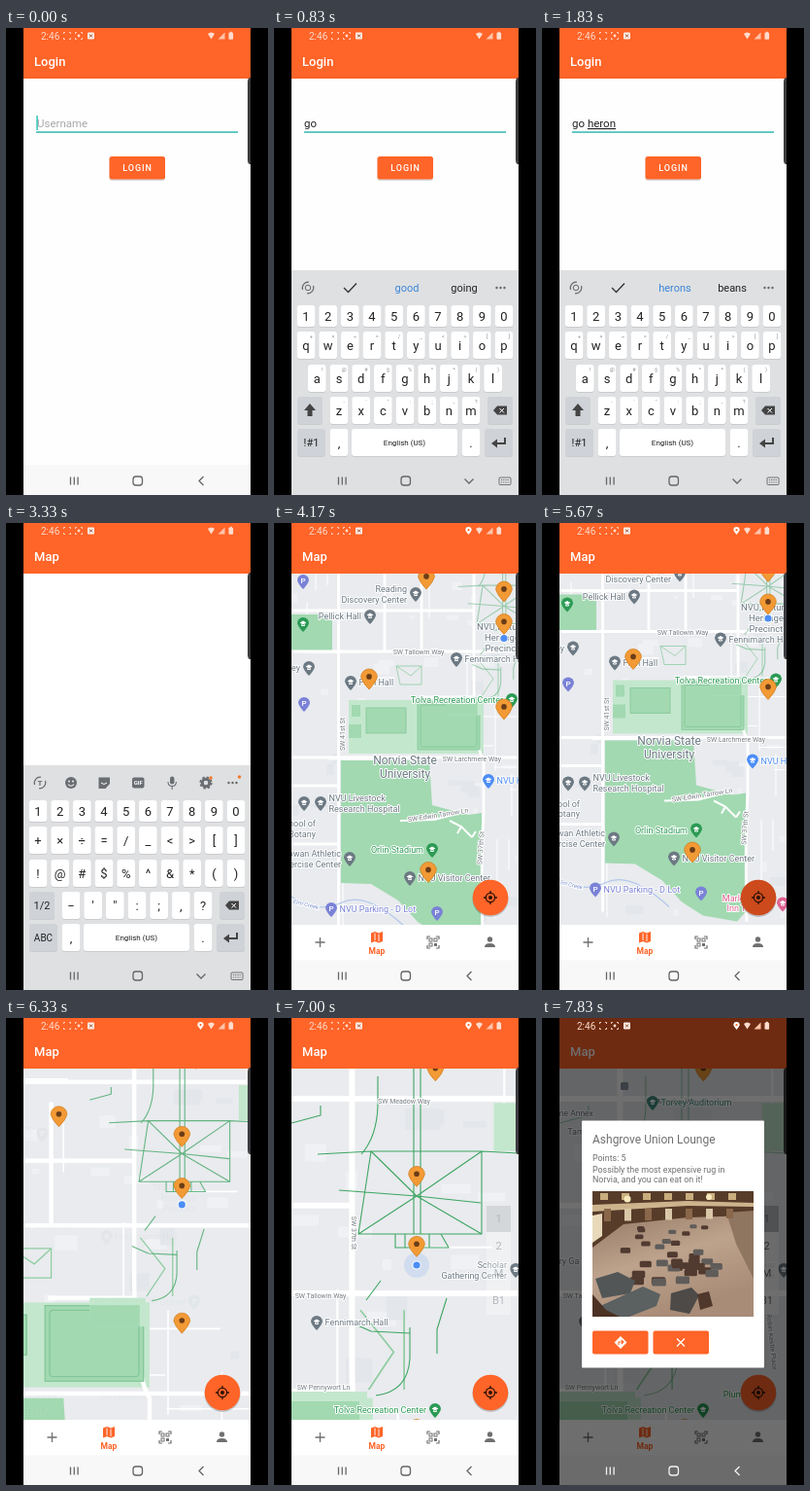
Recreate the animation shown at these times as an HTML page. Size 270x480 px, loop 8000 ms.

```html
<!DOCTYPE html>
<html lang="en">
<head>
<meta charset="utf-8">
<title>Campus map app</title>
<style>
html, body { margin: 0; width: 100%; height: 100%; overflow: hidden; background: #000; }
svg { display: block; width: 100vw; height: 100vh; font-family: Roboto, "Open Sans", sans-serif; }
.halo { paint-order: stroke; stroke: #fff; stroke-width: 2px; stroke-linejoin: round; }
.fixed { vector-effect: non-scaling-stroke; }
</style>
</head>
<body>
<svg id="stage" viewBox="0 0 270 480"></svg>
<script>
const ORANGE = '#ff6428', GRAY = '#6c7983', GREEN = '#2b9a54', BLUE = '#4c8df5', VIOLET = '#7a82d6';
const GRASS = '#a2d9b1', PARK = '#c3e7cd', ICON = '#707070', LIGHT = '#ffdccd';
const LOOP = 8000, ZOOM = 2.15, HOME = [237, 118.5];

const clamp = v => Math.max(0, Math.min(1, v));
const ramp = (v, a, b) => clamp((v - a) / (b - a));
const ease = p => p * p * (3 - 2 * p);
const mix = (a, b, p) => a + (b - a) * p;

const rect = (x, y, w, h, fill, r = 0, more = '') =>
  `<rect x="${x}" y="${y}" width="${w}" height="${h}" rx="${r}" fill="${fill}" ${more}/>`;
const circle = (x, y, r, fill, more = '') => `<circle cx="${x}" cy="${y}" r="${r}" fill="${fill}" ${more}/>`;
const line = (d, color, w = 1, more = '') =>
  `<path d="${d}" fill="none" stroke="${color}" stroke-width="${w}" ${more}/>`;
const shape = (d, fill) => `<path d="${d}" fill="${fill}"/>`;
const text = (x, y, s, size, fill, more = '') =>
  `<text x="${x}" y="${y}" font-size="${size}" fill="${fill}" ${more}>${s}</text>`;
const mid = 'text-anchor="middle"';
const group = (id, body, more = '') => `<g id="${id}" ${more}>${body}</g>`;
const at = (x, y, body) => `<g transform="translate(${x} ${y})">${body}</g>`;

let seed = 7;
const rand = () => (seed = seed * 16807 % 2147483647) / 2147483647;

// ---------- map labels and markers ----------
const DROP = 'M-6 0A6 6 0 1 1 6 0Q5 4 0 9Q-5 4 -6 0Z';
const CAP = 'M-3.4 -.6L0 -2.6 3.4 -.6 0 1.4ZM-2 1V2.4Q0 3.6 2 2.4V1L0 2.2Z';
const placed = [];
const layers = { lo: '', edge: '', hi: '', late: '', pins: '' };

function place(layer, x, y, body) {
  const close = layer === 'hi' || layer === 'late';
  const world = close
    ? [HOME[0] + (x - 147) / ZOOM, HOME[1] + (y - 254) / ZOOM] : [x, y];
  layers[layer] += `<g id="m${placed.length}">${body}</g>`;
  placed.push(world);
}
function poi(layer, x, y, color, label = '', side = 'r', mark = '') {
  const rows = label.split('|');
  const body = shape(DROP, color) +
    (mark ? text(0, 3, mark, 8, '#fff', mid + ' font-weight="500"') : shape(CAP, '#fff'));
  const labels = rows.map((s, i) => text(side === 'r' ? 8.5 : -9, 4 + (i - (rows.length - 1) / 2) * 11, s, 9, color,
    `class="halo" text-anchor="${side === 'r' ? 'start' : 'end'}"`)).join('');
  place(layer, x, y, body + labels);
}
function words(layer, x, y, s, angle = 0, size = 7, color = '#757b81') {
  const rows = s.split('|');
  place(layer, x, y, `<g transform="rotate(${angle})">` + rows.map((r, i) =>
    text(0, size * .35 + i * size * 1.15, r, size, color, 'class="halo" ' + mid)).join('') + '</g>');
}
const pin = (x, y) => place('pins', x, y + 13, at(0, -12.6,
  `<g transform="scale(1.4)"><path d="${DROP}" fill="#f29a35" stroke="#d07c1e" stroke-width=".5"/></g>` + circle(0, -.5, 2.8, '#6b3d18')));

poi('lo', 146, 72, GRAY, 'Reading|Discovery Center', 'l');
poi('lo', 99, 95, GRAY, 'Pellick Hall', 'l');
poi('lo', 30, 103, GREEN);
poi('lo', 30, 59, VIOLET, '', 'r', 'P');
poi('lo', 31, 185, VIOLET, '', 'r', 'P');
poi('lo', 36, 148, GRAY, 'ey', 'l');
poi('lo', 188, 139, GRAY, 'Fennimarch Hall');
poi('lo', 79, 163, GRAY, 'Fern Hall');
poi('lo', 245, 181, GREEN, 'Tolva Recreation Center', 'l');
poi('lo', 48, 287, GRAY, 'NVU Livestock|Research Hospital');
poi('lo', 31, 287, GRAY);
poi('lo', 78, 344, GRAY, 'lowan Athletic|ercise Center', 'l');
poi('lo', 163, 335, GREEN, 'Orlin Stadium', 'l');
poi('lo', 140, 364, GRAY, 'NVU Visitor Center');
poi('lo', 59, 396, VIOLET, 'NVU Parking - D Lot', 'r', 'P');
poi('lo', 168, 400, VIOLET, '', 'r', 'P');
poi('lo', 221, 264, BLUE, 'NVU Heron Shop');
words('lo', 29, 309, 'hool of|Botany', 0, 9, GRAY);
words('lo', 235, 107, 'NVU Natural|Heritage|Precinct', 0, 9.5, GRAY);
words('lo', 135, 244, 'Norvia State|University', 0, 12, GRAY);
words('lo', 149, 133, 'SW Tallowin Way');
words('lo', 204, 243, 'SW Larchmere Way');
words('lo', 71, 217, 'SW 41st St', -90);
words('lo', 213, 334, 'SW 37th St', -86);
words('lo', 169, 300, 'SW Edwin Tarrow Ln', -9);
words('lo', 33, 392, 'Elm Creek', 14, 6, '#7d93cc');
words('edge', 217, 406, 'Marlow Court|Inn Tessaly', 0, 9, '#e0608f');
poi('edge', 252, 411, '#e0608f');

poi('hi', 44, 312, GRAY, 'Fennimarch Hall');
poi('hi', 249, 258, GRAY, 'Scholar|Gathering Center', 'l');
poi('hi', 166, 402, GREEN, 'Tolva Recreation Center', 'l');
words('hi', 134, 86, 'SW Meadow Way');
words('hi', 82, 221, 'SW 37th St', 90);
words('hi', 48, 286, 'SW Tallowin Way');
words('hi', 51, 380, 'SW Pennywort Ln');

poi('late', 114, 86, '#3c8d7d', 'Torvey Auditorium');
words('late', 33, 98, 'ane Annex', 0, 8.5, GRAY);
words('late', 35, 117, 'Tam', 0, 9, GRAY);
words('late', 68, 138, 'NV', 0, 9, GRAY);
words('late', 28, 250, 'ry Ga', 0, 9, GRAY);
words('late', 197, 387, 'Plum', 0, 9, GREEN);
words('late', 237, 333, 'Robin Kestle Place', 84);
place('late', 85, 70, rect(-4, -4, 8, 8, '#8a93a3', 1.5));

pin(157, 55); pin(237, 68); pin(237, 101.5); pin(98, 158);
pin(237, 189); pin(159, 356.5); pin(246, 17.5);

// ---------- map ground ----------
function ground() {
  let s = rect(-80, -80, 480, 620, '#e9ebee');
  for (let i = 0; i < 90; i++) {
    const x = rand() * 290, y = rand() * 420;
    s += rect(x, y, 4 + rand() * 14, 3 + rand() * 9, rand() < .6 ? '#f0f1f4' : '#e3e6ea', .5);
  }
  for (let i = 0; i < 34; i++) {
    const x = Math.round(rand() * 280), y = Math.round(rand() * 400), n = 20 + rand() * 60;
    s += line(`M${x} ${y}${i % 2 ? 'h' : 'v'}${n}`, '#fff', 1);
  }
  s += rect(18, 94, 42, 37, GRASS) + rect(77, 182, 139, 55, PARK) + rect(274, 41, 14, 23, PARK);
  s += shape('M69 244H160L163 290 200 300 214 298V420L205 430 170 424 148 410 128 388 100 371 69 370Z', GRASS);
  s += line('M66.5 20V420M18 132H300M18 241H300M206 10V160Q206 230 216 244V300Q213 340 215 430M120 39H300M150 179H206' +
    'M18 90H205M114 20V132M152 52V132M18 270H66M18 330H66', '#fff', 2.8);
  s += line('M130 306L165 305 200 296M181 306L193 312 204 323M193 312L189 319M204 323L208 317', '#fff', 2);
  s += line('M18 384Q45 402 70 390T135 415', '#b3c7ec', 1.3);
  const field = 'stroke="#83c698" stroke-width=".8"';
  s += rect(95, 190, 41, 26, GRASS, 0, field) + rect(80, 187, 9, 12, GRASS) + rect(77, 207, 13, 14, GRASS) +
    rect(148, 184, 64, 49, GRASS, 0, field) + rect(151, 187, 58, 43, 'none', 2, field);
  s += line('M126 147H152V166H130ZM126 147L141 157 152 147M210 140L226 160 214 178M231 140V178', '#8fcda2', .8);
  // campus lawn, drawn at close zoom
  const paths = 'M100 137H214V222H87ZM147 183L100 137M147 183L214 137M147 183L214 222M147 183L87 222' +
    'M144 52V222M151 52V222M67 177L147 183 213 190M45 140L100 137M214 137L252 139M107 60V90Q106 122 90 140' +
    'M18 108L48 100V90M125 222V236H180L172 222M135 222V236M160 222V236M77 312L100 322 140 324M140 318V350Q138 384 105 388' +
    'M178 288L168 320V345M110 270L95 290';
  const lawn = rect(18, 384, 78, 40, PARK) + rect(18, 394, 70, 30, GRASS) +
    line(paths, '#3fa564', 1.1, 'id="paths" class="fixed" stroke-linejoin="round"');
  return s + `<g transform="translate(${HOME}) scale(${1 / ZOOM}) translate(-147 -254)">${lawn}</g>`;
}

// ---------- keyboard ----------
const SIGNS = ['+', '×', '÷', '=', '/', '_', '&lt;', '&gt;', '[', ']'];
const keySpots = {};
const column = i => 33 + i * 22.67;
function key(cx, y, h, w, label, sub = '', fill = '#fff', size = 13) {
  keySpots[label] = [cx - w / 2, y, w, h];
  return rect(cx - w / 2, y + 1, w, h, '#c9cbce', 3) + rect(cx - w / 2, y, w, h, fill, 3) +
    text(cx, y + h / 2 + size * .36, label, size, '#222', mid) +
    (sub ? text(cx + w / 2 - 4, y + 7, sub, 5.5, '#8b8e93', mid) : '');
}
const row = (chars, start, y, h, subs = '') =>
  [...chars].map((c, i) => key(column(start + i), y, h, 18.6, c, subs[i])).join('');

function keyboard() {
  const dark = '#cfd2d7';
  const letters = row('qwertyuiop', 0, 312, 28, SIGNS) +
    row('asdfghjkl', .5, 346, 28, '!@#$%^*()') + row('zxcvbnm', 1.5, 379, 28, `-'":;,?`) +
    key(37, 379, 28, 26, '', '', dark) + shape('M37 386L43 393H39.5V399H34.5V393H31Z', '#444') +
    key(38.5, 412, 28, 29, '!#1', '', dark, 11);
  const symbols = row(SIGNS, 0, 312, 28) +
    row(['!', '@', '#', '$', '%', '^', '&amp;', '*', '(', ')'], 0, 346, 28) +
    row(`−'":;,?`, 1.5, 379, 28) + key(37, 379, 28, 26, '1/2', '', dark, 11) + key(38.5, 412, 28, 29, 'ABC', '', dark, 10);
  const shared = row('1234567890', 0, 285, 22) + key(233, 379, 28, 26, '', '', dark) +
    shape('M226 393L230 388.5H240V397.5H230Z', '#444') + line('M232.5 391L237 395.5M237 391L232.5 395.5', '#fff', 1) +
    key(67, 412, 28, 18.6, ',') + key(203, 412, 28, 18.6, '.') + key(134.5, 412, 28, 109, 'English (US)', '', '#fff', 8) +
    key(231.5, 412, 28, 29, '', '', dark) + line('M238 421V427H228', '#444', 2) + shape('M224 427L230 422.5V431.5Z', '#444');
  keySpots[' '] = keySpots['English (US)'];
  const spin = line('M29.5 269A6 6 0 0 1 36 261.2M40.5 265A6 6 0 0 1 34 272.8', '#666', 1.1);
  const dots = [229.5, 233.5, 237.5].map(x => circle(x, 267, 1.2, '#666')).join('');
  const ink = '#6a6d72';
  const tools = spin + text(35, 270, 'T', 8, ink, mid + ' font-weight="700"') +
    circle(67, 267, 6, ink) + circle(65, 265.5, .9, '#fff') + circle(69, 265.5, .9, '#fff') + line('M64 268.5Q67 272 70 268.5', '#fff', 1.1) +
    shape('M95.5 261.5H107V268L102.5 273H95.5Z', ink) + line('M98 267Q101 270 104 267', '#fff', 1) +
    rect(130, 261.5, 12.5, 11, ink, 2) + text(136.2, 269.3, 'GIF', 6, '#fff', mid + ' font-weight="700"') +
    rect(169, 260.5, 4.4, 8, ink, 2.2) + line('M167 266Q167 270.5 171.2 270.5T175.4 266M171.2 270.5V274', ink, 1.1) +
    circle(206, 267, 3.8, 'none', `stroke="${ink}" stroke-width="3"`) +
    circle(206, 267, 5.8, 'none', `stroke="${ink}" stroke-width="1.6" stroke-dasharray="2.5 2.05"`) +
    circle(211, 262, 1.8, '#f47b30') + circle(240.5, 261, 1.8, '#f47b30');
  const hints = spin + circle(35, 267, 2.8, 'none', 'stroke="#666"') + line('M72 267L76.5 271.5 85 262.5', '#333', 1.3) +
    text(137, 271, '', 11, '#3b86d8', mid + ' id="hintA"') + text(196, 271, '', 11, '#222', mid + ' id="hintB"');
  return rect(18, 249, 234, 231, '#dfe0e2') + dots + group('tools', tools) + group('hints', hints) + shared +
    group('letters', letters) + group('symbols', symbols) + rect(0, 0, 0, 0, '#000', 3, 'id="press" opacity=".18"');
}

// ---------- screens ----------
const login = text(32, 102, 'Username', 11.5, '#a9a9a9', 'id="holder"') +
  text(31, 102, '', 11.5, '#222', 'id="typed" xml:space="preserve"') +
  rect(31, 106.3, 208, 1.5, '#35b8b4') + rect(31.4, 90, 1.3, 15, '#14b8ad', 0, 'id="caret"') +
  rect(106.5, 133, 57.5, 24, '#d9d9d9', 2.5) + rect(106.5, 132, 57.5, 23.5, ORANGE, 2.5, 'id="button"') +
  text(135.5, 147.3, 'LOGIN', 9, '#fff', mid + ' font-weight="500" letter-spacing=".9"');

const tabs = rect(18, 413, 234, 37, '#fff') + line('M42.5 431H52.5M47.5 426V436', ICON, 1.3) +
  shape('M100 421.5L104 420 108 421.5 112 420V430L108 431.5 104 430 100 431.5Z', ORANGE) +
  line('M104 421.5V429M108 422.5V430', '#fff', .9) + text(106, 442.5, 'Map', 8.5, ORANGE, mid + ' font-weight="700"') +
  line('M158 428V425H161M167 425H170V428M170 434V437H167M161 437H158V434', ICON, 1.2) +
  [[160, 427], [165, 427], [160, 432]].map(([x, y]) => rect(x, y, 3, 3, 'none', 0, `stroke="${ICON}"`)).join('') + rect(165, 432, 3, 3, ICON) +
  circle(222.5, 428, 2.7, ICON) + shape('M217 436Q217 432 222.5 432T228 436Z', ICON);

const levels = rect(219, 193, 25, 112, '#fff', 1, 'opacity=".75"') + rect(219, 193, 25, 27, '#b9bcc0') +
  ['1', '2', 'M', 'B1'].map((s, i) => text(231.5, 210 + i * 28, s, 11, '#6a6d72', mid)).join('');

const dot = circle(0, 0, 13, BLUE, 'id="aura"') + circle(0, 0, 4.6, '#fff') + circle(0, 0, 3.6, BLUE);
const labelLayers = ['lo', 'edge', 'hi', 'late'].map(k => group(k, layers[k])).join('');
const mapScreen = rect(18, 52, 234, 361, '#fff') +
  `<g clip-path="url(#window)">` + group('ground', ground()) + labelLayers +
  group('dot', dot) + group('pins', layers.pins) + group('levels', levels) + '</g>' +
  group('fab', circle(223, 386.5, 18.5, '#000', 'opacity=".2"') + circle(223, 385, 18.3, ORANGE, 'id="fabFace"') +
    circle(223, 385, 4.6, 'none', 'stroke="#2b1208" stroke-width="1.3"') + circle(223, 385, 2, '#2b1208') +
    line('M223 378V380.5M223 389.5V392M216 385H218.5M227.5 385H230', '#2b1208', 1.3)) + group('tabs', tabs);

const corners = x => line(`M${x - 3.5} 6V4.5H${x - 2}M${x + 2} 4.5H${x + 3.5}V6M${x + 3.5} 10V11.5H${x + 2}M${x - 2} 11.5H${x - 3.5}V10`, LIGHT, .9);
const statusBar = text(36, 11.6, '2:46', 10, LIGHT) + corners(63) + corners(75) +
  circle(75, 8, 1.4, LIGHT) + rect(84, 4.5, 7, 7, '#ffeee6', 1) + line('M86 6.5L89 9.5M89 6.5L86 9.5', '#8a4a30') +
  group('gps', at(200.5, 7.2, `<g transform="scale(.52)">${shape(DROP, '#fff')}</g>` + circle(0, 0, 1.1, ORANGE))) +
  shape('M208 6Q211.5 3 215 6L211.5 11.5Z', LIGHT) + shape('M218.5 11.5L225.5 4.5V11.5Z', '#ffc3aa') +
  rect(229.5, 4.8, 4.6, 7, LIGHT, .8) + rect(230.8, 3.8, 2, 1.2, LIGHT);

const pen = 'currentColor';
const systemKeys = line('M66.5 461.5V469.5M70.3 461.5V469.5M74.1 461.5V469.5', pen, 1.3) +
  rect(131, 461, 9.5, 9, 'none', 2.8, `stroke="${pen}" stroke-width="1.3"`) +
  line('M203.5 461L199 465.5 203.5 470', pen, 1.3, 'id="back"') +
  group('hide', line('M196.5 463.5L201 468 205.5 463.5', pen, 1.3) + rect(232, 462, 12, 7.5, 'none', 1, `stroke="${pen}" stroke-width=".9"`) +
    line('M234 464.5H242M234 467H242', pen, 1, 'stroke-dasharray="1.2 1"'));

function lounge() {
  let s = rect(52, 178, 166, 129, 'url(#floor)') + shape('M52 178H218V203L150 205 84 212 52 236Z', '#573c2a');
  s += shape('M52 192L150 188 218 190V194L150 193 52 199Z', '#cdb48d') + shape('M190 200L218 198V268L200 232Z', '#8f7660');
  for (let i = 0; i < 7; i++) s += rect(60 + i * 22, 180, 8, 7, '#c9ad7e') + rect(64 + i * 21, 196, 7, 13 - i * .5, i % 2 ? '#d9c8a8' : '#8a674a');
  s += shape('M52 203L62 201V224L52 231Z', '#e8d9ba') + circle(88, 186, 3.5, '#f8e9bd') + circle(172, 184, 3, '#f8e9bd');
  for (let i = 0; i < 34; i++) {
    const y = 211 + rand() * 58, w = (y - 195) * .13 + 5;
    s += rect(70 + rand() * 95 + (y - 211) * .25, y, w, w * .55, rand() < .6 ? '#513a30' : '#5f5c5a', 1.5);
  }
  return s + shape('M55 268L78 261 96 270 91 283 62 288Z', '#525657') + shape('M60 296L104 276 122 284 118 296 90 307H60Z', '#5b6061') +
    shape('M133 283L154 277 162 285 152 304 132 300Z', '#4d4a48') + shape('M160 284L172 281 176 296 163 300Z', '#50382c') +
    shape('M52 284L66 300 80 307H52Z', '#4b3224');
}
const dialog = rect(41, 105.5, 188, 254, '#fff', 1) + text(52, 129, 'Ashgrove Union Lounge', 12, '#707070') +
  ['Points: 5', 'Possibly the most expensive rug in', 'Norvia, and you can eat on it!'].map((s, i) =>
    text(52, [147, 158.7, 169.3][i], s, 8.9, '#707070')).join('') + lounge() +
  rect(52, 321.5, 57.5, 24, ORANGE, 2) + rect(114.5, 321.5, 57.5, 24, ORANGE, 2) +
  shape('M81 327L87.5 333.5 81 340 74.5 333.5Z', '#fff') + line('M79 336V333H83M81.8 331L84 333 81.8 335', ORANGE, 1.1) +
  line('M139 329.5L147 337.5M147 329.5L139 337.5', '#fff', 1.3);

const stage = document.getElementById('stage');
stage.innerHTML = `<defs><clipPath id="window"><rect x="18" y="52" width="234" height="361"/></clipPath>
  <linearGradient id="floor" x2=".4" y2="1"><stop offset=".1" stop-color="#8f7561"/><stop offset=".6" stop-color="#bda28c"/><stop offset="1" stop-color="#a88c77"/></linearGradient></defs>` +
  rect(18, 0, 234, 480, '#fefefe') + group('login', login) + group('map', mapScreen) +
  rect(18, 0, 234, 52, ORANGE) + text(29, 39, '', 13, '#fff', 'id="title" font-weight="500"') +
  shape('M252 51H251Q249 52 249 55V136Q249 139 251 140H252Z', '#3c3c3f') +
  group('keyboard', keyboard()) + rect(18, 449.5, 234, 31, '#f8f8f8', 0, 'id="navBack"') +
  rect(18, 0, 234, 480, '#000', 0, 'id="dim"') + statusBar + group('systemKeys', systemKeys) + group('dialog', dialog) +
  rect(0, 0, 18, 480, '#000') + rect(252, 0, 18, 480, '#000');

// ---------- animation ----------
const $ = Object.fromEntries([...stage.querySelectorAll('[id]')].map(e => [e.id, e]));
const set = (id, attrs) => { for (const k in attrs) $[id].setAttribute(k, attrs[k]); };
const fade = (id, o) => set(id, { opacity: o, display: o > 0 ? 'inline' : 'none' });
const show = (id, on) => set(id, { display: on ? 'inline' : 'none' });

const phrase = 'go heron!';
const strikes = [560, 700, 840, 980, 1130, 1280, 1440, 1600, 2330];

function view(t) {
  const pan = ease(ramp(t, 4830, 5450)), zoom = ease(ramp(t, 5780, 6750));
  const s = ZOOM ** zoom;
  const x = mix(HOME[0] - 4 * pan, 147, zoom), y = mix(HOME[1] - 20.5 * pan, 254, zoom);
  return { s, zoom, x: x - s * HOME[0], y: y - s * HOME[1] };
}

function drawTyping(t) {
  const count = strikes.filter(k => t >= k).length, typed = phrase.slice(0, count);
  const composing = count > 3 && count < 9;
  $.typed.innerHTML = composing ? `go <tspan text-decoration="underline">${typed.slice(3)}</tspan>` : typed;
  show('holder', !count);
  show('caret', !count);
  const hinting = count > 0 && t < 2450;
  show('hints', hinting);
  show('tools', !hinting);
  $.hintA.textContent = count < 4 ? 'good' : 'herons';
  $.hintB.textContent = count < 4 ? 'going' : 'beans';
  const symbols = t >= 2100;
  show('letters', !symbols);
  show('symbols', symbols);
  const held = count > 0 && t - strikes[count - 1] < 110;
  show('press', held);
  if (held) {
    const [x, y, width, height] = keySpots[phrase[count - 1]];
    set('press', { x, y, width, height });
  }
}

function drawMap(t) {
  const v = view(t), late = ramp(t, 7170, 7300);
  const far = 1 - ramp(v.s, 1.25, 1.6);
  const spot = ([x, y]) => `translate(${v.x + v.s * x} ${v.y + v.s * y})`;
  set('ground', { transform: `translate(${v.x} ${v.y}) scale(${v.s})` });
  set('dot', { transform: spot(HOME) });
  placed.forEach((p, i) => set('m' + i, { transform: spot(p) }));
  fade('ground', ramp(t, 3600, 3850));
  fade('paths', mix(.45, 1, v.zoom) * (1 - .5 * late));
  fade('lo', ramp(t, 3800, 4050) * far);
  fade('edge', ramp(t, 4830, 5000) * far);
  fade('hi', ramp(t, 6600, 6850));
  fade('late', late);
  fade('levels', ramp(t, 6880, 7170));
  fade('aura', .15 * ramp(t, 6600, 6900));
  show('pins', t >= 3950);
  show('dot', t >= 3950);
  show('fab', t >= 3500);
  show('tabs', t >= 3500);
  set('fabFace', { fill: t >= 5560 && t < 5900 ? '#cc4a1c' : ORANGE });
}

function draw(t) {
  const onMap = t >= 3170;
  show('login', !onMap);
  show('map', onMap);
  $.title.textContent = onMap ? 'Map' : 'Login';
  set('button', { fill: t >= 3000 ? '#ff9468' : ORANGE });
  show('gps', t >= 3600);

  const lift = ease(ramp(t, 170, 480)) * (1 - ease(ramp(t, 3380, 3580)));
  set('keyboard', { transform: `translate(0 ${(1 - lift) * 231})` });
  show('keyboard', lift > 0);
  const typing = lift > .5;
  set('navBack', { fill: typing ? '#dfe0e2' : '#f8f8f8' });
  show('back', !typing);
  show('hide', typing);
  drawTyping(t);
  if (onMap) drawMap(t);

  const open = ramp(t, 7330, 7500), size = mix(.92, 1, ease(open));
  set('systemKeys', { color: open > 0 ? '#f2f2f2' : '#666' });
  fade('dim', .57 * open);
  fade('dialog', open);
  set('dialog', { transform: `translate(135 232) scale(${size}) translate(-135 -232)` });
}

function tick() {
  draw(performance.now() % LOOP);
  requestAnimationFrame(tick);
}
tick();
</script>
</body>
</html>
```
